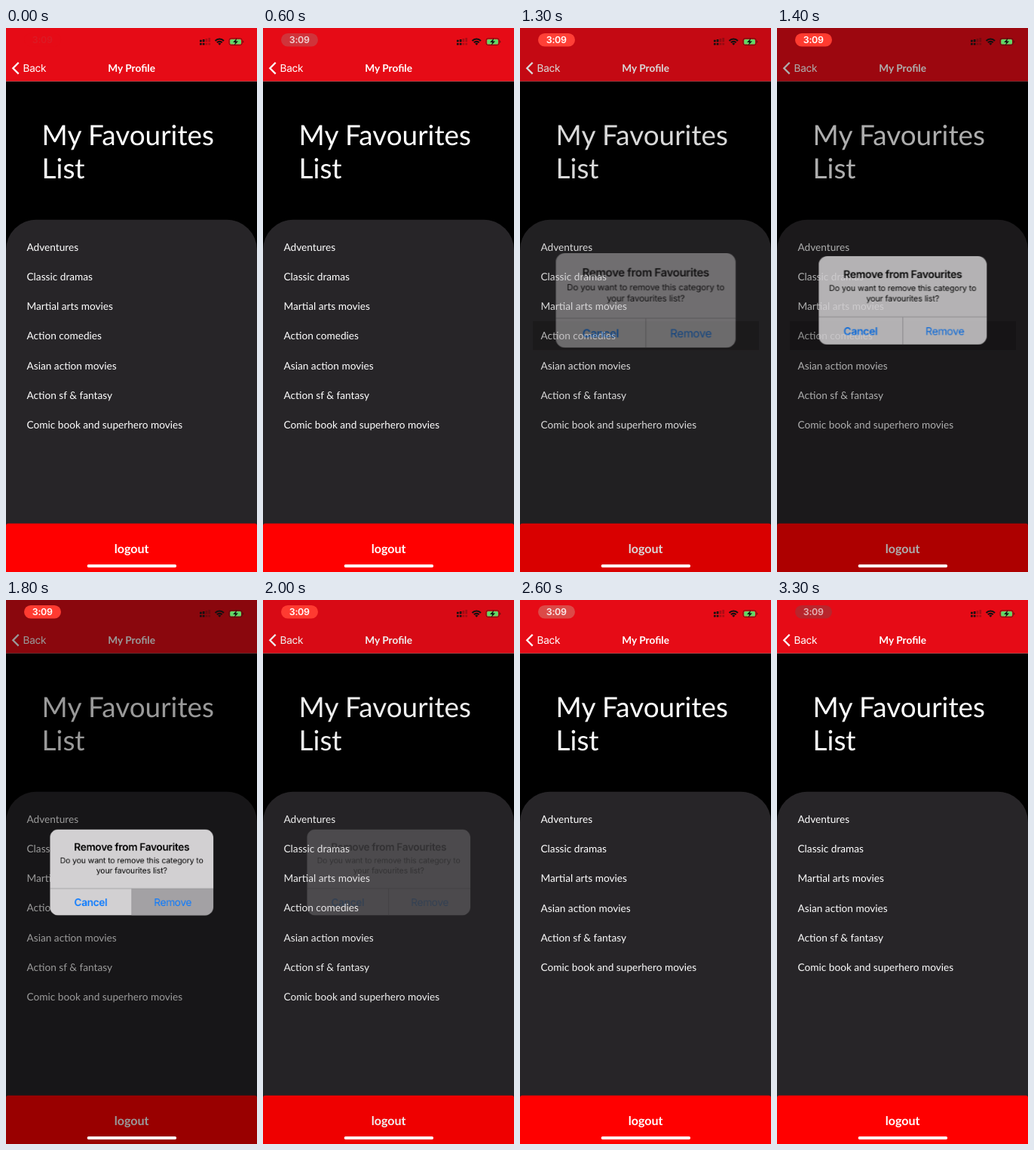
An HTML page that plays this animation: 333x720 px, repeating every 3400 ms.

```html
<!DOCTYPE html>
<html lang="en">
<head>
<meta charset="utf-8">
<title>My Profile</title>
<style>
  html, body { margin: 0; width: 100%; height: 100%; overflow: hidden; background: #000; }
  svg { display: block; width: 333px; height: 720px; }
  text { fill: #fff; font: 13.67px Lato, sans-serif; text-rendering: geometricPrecision; }
  .ui { font-family: Inter, sans-serif; letter-spacing: -.024em; }
  .mid { text-anchor: middle; }
  .bold { font-weight: 700; }
  .semi { font-weight: 600; }
  .title { font-size: 36.9px; }
  #logout { font-size: 16.1px; }
  #clock { font-size: 12.4px; }
  #alert text { fill: #000; }
  #alert .note { font-size: 10.45px; letter-spacing: -.01em; }
  #alert .act { fill: #0a7aff; }
  #alert { transform-origin: 166.7px 360.5px; }
</style>
</head>
<body>
<svg viewBox="0 0 333 720">
  <rect width="333" height="720"/>
  <rect width="333" height="70.6" fill="#e60b16"/>
  <rect y="70.5" width="333" height=".3" fill="#d8d8d8"/>
  <path d="M16.7 45.8 9.3 53.2l7.4 7.4" fill="none" stroke="#fff" stroke-width="2.3"/>
  <text class="ui" x="22.6" y="58">Back</text>
  <text class="mid bold" x="166.7" y="58.2">My Profile</text>
  <text class="title" x="47.6" y="155">My Favourites</text>
  <text class="title" x="47.6" y="198.9">List</text>

  <rect y="253.8" width="333" height="520" rx="40" fill="#272528"/>
  <g id="list"></g>
  <rect y="655.8" width="333" height="80" rx="3" fill="#f00"/>
  <text id="logout" class="mid bold" x="166.7" y="694.5">logout</text>

  <rect id="shade" width="333" height="720"/>
  <g id="alert">
    <clipPath id="card"><rect x="58.2" y="303.5" width="217" height="114" rx="11.3"/></clipPath>
    <g clip-path="url(#card)">
      <rect x="58" y="303" width="218" height="115" fill="#d2d0d2"/>
      <rect id="hit" x="167" y="382" width="109" height="36" fill="#a3a1a4"/>
      <path d="M58 381.8h218M166.8 382v36" stroke="#9b999c" stroke-width=".8"/>
    </g>
    <g id="labels">
      <text class="ui mid semi" x="166.7" y="332">Remove from Favourites</text>
      <text class="ui mid note" x="166.7" y="348.6">Do you want to remove this category to</text>
      <text class="ui mid note" x="166.7" y="361.6">your favourites list?</text>
      <text class="ui mid semi act" x="112.3" y="404.7">Cancel</text>
      <text class="ui mid act" x="221.2" y="404.7">Remove</text>
    </g>
  </g>

  <rect id="pill" x="24" y="7" width="49" height="17.6" rx="8.8"/>
  <text id="clock" class="ui mid semi" x="48.2" y="20.2">3:09</text>
  <g id="signal"></g>
  <g fill="none" stroke="#111" stroke-width="2.1">
    <path d="M277.6 16.9a8 8 0 0 1 11.4 0M279.9 19.3a4.8 4.8 0 0 1 6.8 0"/>
    <path d="M283.3 22.8l-2-2.1a2.8 2.8 0 0 1 4 0z" fill="#111" stroke="none"/>
  </g>
  <rect x="296" y="13.8" width="17.2" height="8.8" rx="2.6" fill="none" stroke="#3c1013" stroke-opacity=".7" stroke-width=".9"/>
  <rect x="297.2" y="15" width="14.8" height="6.4" rx="1.5" fill="#62d967"/>
  <path d="M314.2 16.6a1.7 1.7 0 0 1 0 3.2z" fill="#3c1013" fill-opacity=".7"/>
  <path d="M306.3 13.6l-5.2 5.3h3l-1.2 4 5.2-5.4h-3z" fill="#111"/>
  <rect x="107.6" y="710.1" width="118.6" height="4" rx="2" fill="#fff"/>
</svg>
<script>
const LOOP = 3400, ROW = 39.1;
const $ = id => document.getElementById(id);

function add(parent, tag, attrs, text = '') {
  const el = document.createElementNS('http://www.w3.org/2000/svg', tag);
  for (const k in attrs) el.setAttribute(k, attrs[k]);
  el.textContent = text;
  return parent.appendChild(el);
}

function play(el, prop, keys) {
  const all = [[0, keys[0][1]], ...keys, [LOOP, keys[keys.length - 1][1]]];
  el.animate(all.map(([t, v]) => ({ offset: t / LOOP, [prop]: v })),
    { duration: LOOP, iterations: Infinity, easing: 'steps(34, end)', delay: -15 });
}

const flip = (t, a, b) => [[t, a], [t, b]];

['Adventures', 'Classic dramas', 'Martial arts movies', 'Action comedies',
 'Asian action movies', 'Action sf & fantasy', 'Comic book and superhero movies'
].forEach((name, i) => {
  const row = add($('list'), 'g', {}), y = 270.7 + i * ROW;
  if (i === 3) {
    const press = add(row, 'rect', { x: 17, y, width: 300, height: 38.2, fill: '#201e20' });
    play(press, 'opacity', [...flip(1150, 0, 1), ...flip(1550, 1, 0)]);
    play(row, 'opacity', flip(2150, 1, 0));
  }
  const label = add(row, 'text', { x: 27.5, y: y + 24.4 }, name);
  if (i === 3) play(label, 'opacity', [...flip(1150, 1, .82), ...flip(1550, .82, 1)]);
  if (i > 3) play(row, 'transform', flip(2150, 'translateY(0px)', `translateY(${-ROW}px)`));
});

for (let i = 0; i < 4; i++) {
  const h = 2.8 + i * .9, x = 257 + i * 3.8;
  const look = { x, width: 2.7, rx: .5, fill: '#111', opacity: i < 2 ? 1 : .28 };
  add($('signal'), 'rect', { ...look, y: 18.6 - h, height: h });
  add($('signal'), 'rect', { ...look, y: 19.9, height: 2.5 });
}

const fade = [[1200, 0], [1300, .45], [1400, .84], [1500, .96], [1600, 1],
              [1800, 1], [1900, .6], [2000, .23], [2100, .05], [2200, 0]];
play($('alert'), 'opacity', fade);
play($('shade'), 'opacity', fade.map(([t, v]) => [t, .4 * v ** 1.25]));
play($('labels'), 'opacity', [[1800, 1], [2000, .55]]);
play($('alert'), 'transform', [[1200, 1.2], [1300, 1.1], [1400, 1.028], [1500, 1.006], [1600, 1]]
  .map(([t, s]) => [t, `scale(${s})`]));
play($('hit'), 'opacity', [...flip(1650, 0, 1), [1800, 1], [1900, .5], [2000, 0]]);
play($('labels'), 'opacity', [[0, 1], [1800, 1], [2000, .55]]);

play($('pill'), 'fill', [[0, '#e60b16'], [300, '#c0222a'], [900, '#e0454a'], [1200, '#ff443d'],
  [1400, '#ff3b30'], [2000, '#ff3b31'], [2600, '#dc4a48'], [3300, '#b9252c']]);
play($('clock'), 'fill', [[0, '#dc1a24'], [300, '#e0a5a7'], [900, '#fff'], [2300, '#fff'],
  [2600, '#f8e9ea'], [3300, '#e3b4b6']]);
</script>
</body>
</html>
```
